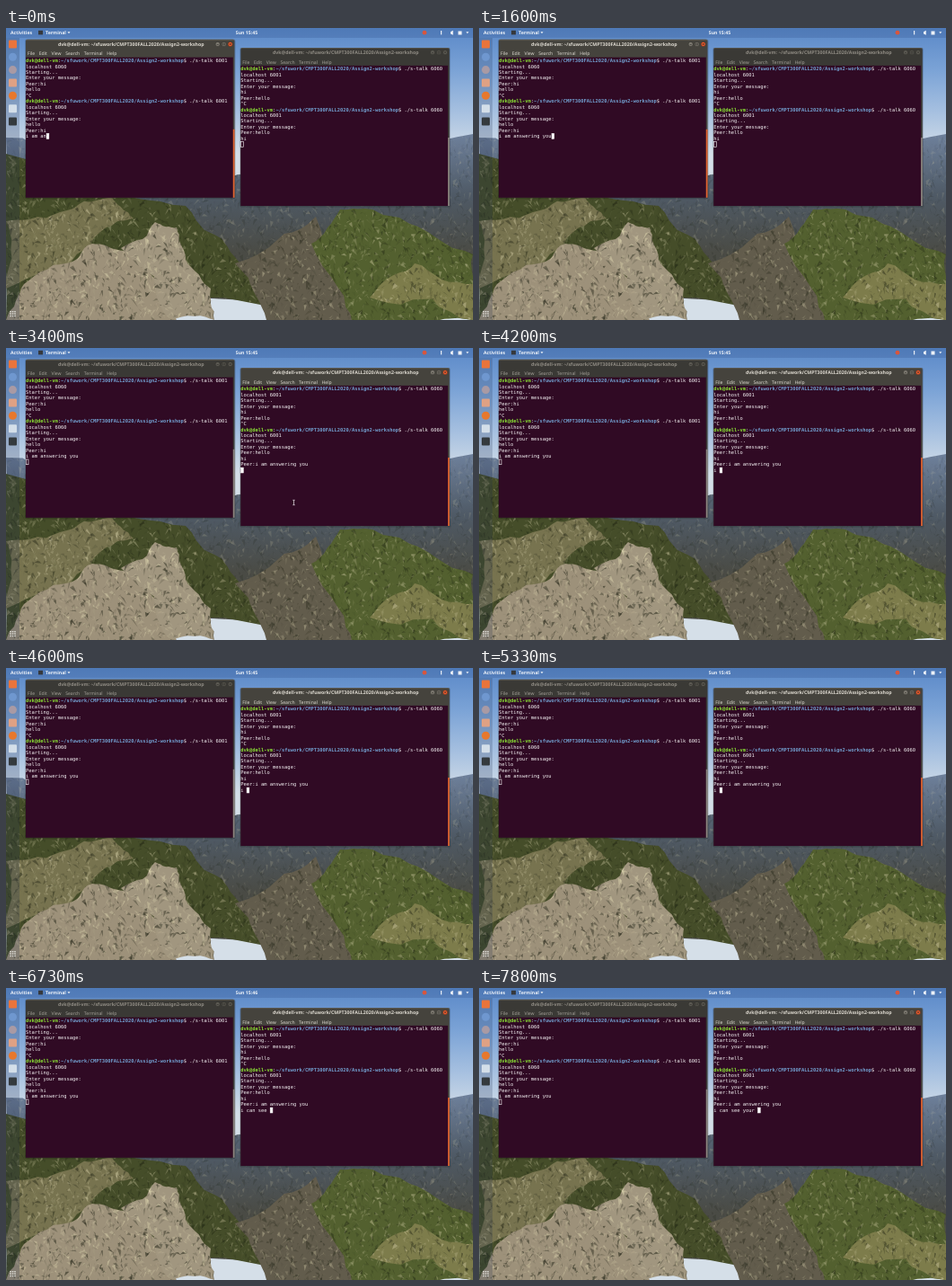
Write an HTML page with a canvas that moves like this. It is 520 by 325 pixels and loops after 8000 ms.

```html
<!DOCTYPE html>
<html lang="en">
<head>
<meta charset="utf-8">
<title>Two terminals chatting</title>
<style>
html, body { margin: 0; width: 100%; height: 100%; overflow: hidden; background: #7f9fca; }
canvas, svg { position: absolute; left: 0; top: 0; width: 520px; height: 325px; }
text { white-space: pre; text-rendering: geometricPrecision; font: 5.1px "Noto Sans", "Open Sans", sans-serif; fill: #dfdbd2; }
.bar text { font-size: 5.2px; font-weight: 600; fill: #eef2f8; }
.title { font-size: 5.22px; font-weight: 700; }
.menu { word-spacing: 3.25px; }
.term text { font: 5.42px "DejaVu Sans Mono", "Liberation Mono", monospace; fill: #f4f1f3; }
.term .user { font-weight: 700; fill: #8ae234; }
.term .path { font-weight: 700; fill: #729fcf; }
.off .title { fill: #918d85; }
.off .menu { fill: #a5a199; }
.frame { fill: #45433d; }
.off .frame { fill: #3a3935; }
.button { fill: #7d7970; stroke: #2b2a27; stroke-width: .5; }
.close { fill: #ee5a2c; }
.thumb { fill: #e2622f; }
.off .close { fill: #6b6861; }
.off .button { fill: #5b5952; }
.off .thumb { fill: #8c8580; }
.cursor { fill: #fff; stroke: #fff; stroke-width: .6; }
.off .cursor { fill: none; }
</style>
</head>
<body>
<canvas id="photo" width="520" height="325"></canvas>
<svg id="stage" viewBox="0 0 520 325"></svg>
<script>
const LOOP = 8000, CELL = 3.263, ROW = 6.46;
const stage = document.getElementById('stage');

function add(parent, tag, attrs = {}, label = '') {
  const node = document.createElementNS('http://www.w3.org/2000/svg', tag);
  for (const key in attrs) node.setAttribute(key, attrs[key]);
  node.textContent = label;
  return parent.appendChild(node);
}
const box = (parent, x, y, width, height, attrs) => add(parent, 'rect', { x, y, width, height, ...attrs });
const dot = (parent, cx, cy, r, attrs) => add(parent, 'circle', { cx, cy, r, ...attrs });
const write = (parent, x, y, label, attrs) => add(parent, 'text', { x, y, ...attrs }, label);

// Mountain photograph: flat shapes with rough edges and seeded light and shade
function paintPhoto() {
  const ctx = document.getElementById('photo').getContext('2d');
  let seed = 41;
  const random = () => (seed = (seed * 16807) % 2147483647) / 2147483647;
  const around = size => (random() - .5) * size;

  function fade(top, bottom, ...colors) {
    const gradient = ctx.createLinearGradient(0, top, 0, bottom);
    colors.forEach((color, i) => gradient.addColorStop(i / (colors.length - 1), color));
    return gradient;
  }

  // Splits each edge in two and pushes the middle aside, three times over
  function roughen(points, depth = 3) {
    if (!depth) return points;
    const finer = points.flatMap(([x, y], i) => {
      const [nx, ny] = points[(i + 1) % points.length];
      const push = Math.hypot(nx - x, ny - y) * .22;
      return [[x, y], [(x + nx) / 2 + around(push), (y + ny) / 2 + around(push)]];
    });
    return roughen(finer, depth - 1);
  }

  function shape(outline, fill, contrast) {
    const points = roughen(outline.split(' ').map(pair => pair.split(',').map(Number)));
    const xs = points.map(p => p[0]), ys = points.map(p => p[1]);
    const x0 = Math.min(...xs), y0 = Math.min(...ys);
    const w = Math.max(...xs) - x0, h = Math.max(...ys) - y0;
    const path = new Path2D('M' + points.join(' ') + 'Z');
    ctx.fillStyle = fill;
    ctx.fill(path);
    ctx.save();
    ctx.clip(path);
    for (let i = 0; i < w * h / 16; i++) {
      const x = x0 + random() * w, y = y0 + random() * h;
      ctx.fillStyle = random() < .55 ? '#14180c' : '#ded6b0';
      ctx.globalAlpha = contrast * random();
      ctx.beginPath();
      ctx.moveTo(x, y);
      ctx.lineTo(x + around(9), y + around(7));
      ctx.lineTo(x + around(9), y + random() * 8);
      ctx.fill();
    }
    ctx.restore();
  }

  ctx.fillStyle = fade(0, 140, '#5a88c8', '#7ba3d6', '#a6c0e0', '#d5dfe8');
  ctx.fillRect(0, 0, 520, 325);
  shape('0,122 200,170 390,135 520,118 520,325 0,325', fade(120, 250, '#6d7f9a', '#4f5a66', '#4a4b45'), .18);
  shape('0,140 110,180 200,198 255,255 350,325 0,325', '#454d29', .35);
  shape('0,215 60,205 118,188 142,212 90,245 0,290', '#77734f', .42);
  shape('255,262 345,210 400,325 290,325', '#625c4c', .38);
  shape('340,240 372,202 420,208 520,252 520,325 385,325', '#53602f', .38);
  shape('405,300 455,262 520,285 520,325', '#7d7c4b', .4);
  shape('0,325 20,285 66,262 96,240 150,252 190,325', '#9d917a', .5);
  shape('128,245 166,216 190,222 200,258 228,290 232,325 185,325', '#a1967f', .5);
}

function drawDesktop() {
  const bar = add(stage, 'g', { class: 'bar' });
  box(bar, 0, 0, 520, 11, { fill: '#26477d', opacity: .22 });
  write(bar, 5, 7.2, 'Activities');
  box(bar, 36, 2.8, 5, 4.6, { fill: '#35383c' });
  write(bar, 44, 7.2, 'Terminal');
  const clock = write(bar, 268, 7.2, '', { 'text-anchor': 'middle' });
  dot(bar, 466, 5.2, 2.4, { fill: '#d8563d' });
  box(bar, 484, 3, 1.2, 4.4, { fill: '#e8edf5' });
  const arrow = 'h3l-1.5 2z';
  add(bar, 'path', { d: `M68.5 4.2${arrow}M512.3 4.2${arrow}M495 4.2l2.8-1.4v5L495 6.4zM503.5 3.4h4v4h-4z`, fill: '#eef2f8' });

  box(stage, 0, 11, 15, 314, { fill: '#1c2c4c', opacity: .2 });
  const icons = ['#e9743b', '#6f97cf', '#a99aa4', '#dfa184', '#e7782d', '#d4dfe9', '#343a3e'];
  const round = [1, 2, 4];
  icons.forEach((fill, i) => box(stage, 3, 13.4 + i * 14.35, 9, 9, { fill, rx: round.includes(i) ? 4.5 : 1 }));
  for (let i = 0; i < 9; i++) {
    box(stage, 4.5 + i % 3 * 2.4, 315 + Math.floor(i / 3) * 2.4, 1.4, 1.4, { fill: '#e9e9e4' });
  }
  return clock;
}

const place = '~/sfuwork/CMPT300FALL2020/Assign2-workshop';
const user = 'dvk@dell-vm';

function drawWindow({ x, y, titleX, lines }) {
  const W = 232.5, H = 176, head = 19.8, thumb = 100, edge = 1.7;
  const win = add(stage, 'g');
  box(win, x - 1, y, W + 2, H + 1.5, { opacity: .2, rx: 2 });
  box(win, x, y, W, H, { class: 'frame', rx: 2 });
  box(win, x, y, W, .6, { fill: '#6b6860', rx: .3 });
  box(win, x, y + head, W - edge, H - head, { fill: '#300a24' });
  box(win, x + W - edge, y + thumb, edge, H - thumb, { class: 'thumb' });
  write(win, titleX, y + 7.2, `${user}: ${place}`, { class: 'title' });
  ['M-1 .5h2', 'M-1-1h2v2h-2z', 'M-1-1l2 2m0-2l-2 2'].forEach((d, i) => {
    const cx = x + 213.7 + i * 7, cy = y + 5.2;
    dot(win, cx, cy, 2.6, { class: i === 2 ? 'button close' : 'button' });
    add(win, 'path', { d, transform: `translate(${cx} ${cy})`, stroke: '#2e2c29', fill: 'none', 'stroke-width': .6 });
  });
  write(win, x + 2, y + 17.5, 'File Edit View Search Terminal Help', { class: 'menu' });

  const term = add(win, 'g', { class: 'term' });
  const base = y + 25.3;
  const rows = lines.map((line, i) => {
    const at = base + i * ROW;
    if (line[0] !== '$') return write(term, x, at, line);
    const row = write(term, x, at, '');
    add(row, 'tspan', { class: 'user' }, user);
    add(row, 'tspan', {}, ':');
    add(row, 'tspan', { class: 'path' }, place);
    add(row, 'tspan', {}, line);
    return row;
  });
  const cursor = box(term, 0, 0, CELL - .6, 5.8, { class: 'cursor' });
  return {
    rows,
    focus(on) { win.setAttribute('class', on ? 'on' : 'off'); },
    moveCursor(col, row, shown = true) {
      cursor.setAttribute('x', x + col * CELL + .3);
      cursor.setAttribute('y', base + row * ROW - 4.6);
      cursor.style.visibility = shown ? '' : 'hidden';
    }
  };
}

paintPhoto();
const clock = drawDesktop();
const opening = port => ['localhost ' + port, 'Starting...', 'Enter your message:'];
const right = drawWindow({
  x: 261.3, y: 22, titleX: 297,
  lines: ['$ ./s-talk 6060', ...opening(6001), 'hi', 'Peer:hello', '^C',
    '$ ./s-talk 6060', ...opening(6001), 'Peer:hello', 'hi', '', '']
});
const left = drawWindow({
  x: 22, y: 12.8, titleX: 58,
  lines: ['$ ./s-talk 6001', ...opening(6060), 'Peer:hi', 'hello', '^C',
    '$ ./s-talk 6001', ...opening(6060), 'hello', 'Peer:hi', '']
});
const beam = add(stage, 'path', {
  d: 'M-1.2-2.7h2.4M0-2.7v5.4M-1.2 2.7h2.4', fill: 'none', stroke: '#eee8ec', 'stroke-width': .7
});

// Each burst adds its keys one by one at an even pace
const SEND = 2330, SWITCH = 3400, REPLY = 3870;
const question = [
  { at: 0, every: 0, keys: 'i am an' },
  { at: 515, every: 108, keys: 'swering you' }
];
const reply = [
  { at: REPLY, every: 130, keys: 'i ' },
  { at: 5870, every: 65, keys: 'can' },
  { at: 6130, every: 148, keys: ' see ' },
  { at: 6890, every: 20, keys: 'you' },
  { at: 7670, every: 130, keys: 'r ' }
];
const typed = (bursts, t) => bursts.map(({ at, every, keys }) =>
  t < at ? '' : keys.slice(0, every ? 1 + Math.floor((t - at) / every) : keys.length)).join('');

function show(t) {
  const sent = t >= SEND;
  clock.textContent = t < 5400 ? 'Sun 15:45' : 'Sun 15:46';
  left.focus(t < SWITCH);
  right.focus(t >= SWITCH);

  const asked = typed(question, t), answer = typed(reply, t);
  left.rows[13].textContent = asked;
  left.moveCursor(sent ? 0 : asked.length, sent ? 14 : 13, t < 2130 || sent);
  right.rows[13].textContent = sent ? 'Peer:' + asked : '';
  right.rows[14].textContent = answer;
  right.moveCursor(answer.length, sent ? 14 : 13);

  const p = Math.min(1, Math.max(0, (t - 2670) / 530));
  const ease = p * (2 - p);
  beam.setAttribute('transform', `translate(${215 + 105.5 * ease} ${145 + 27 * ease})`);
  beam.style.visibility = t >= 2670 && t < REPLY ? '' : 'hidden';
}

const begin = performance.now();
function tick() {
  show((performance.now() - begin) % LOOP);
  requestAnimationFrame(tick);
}
tick();
</script>
</body>
</html>
```
